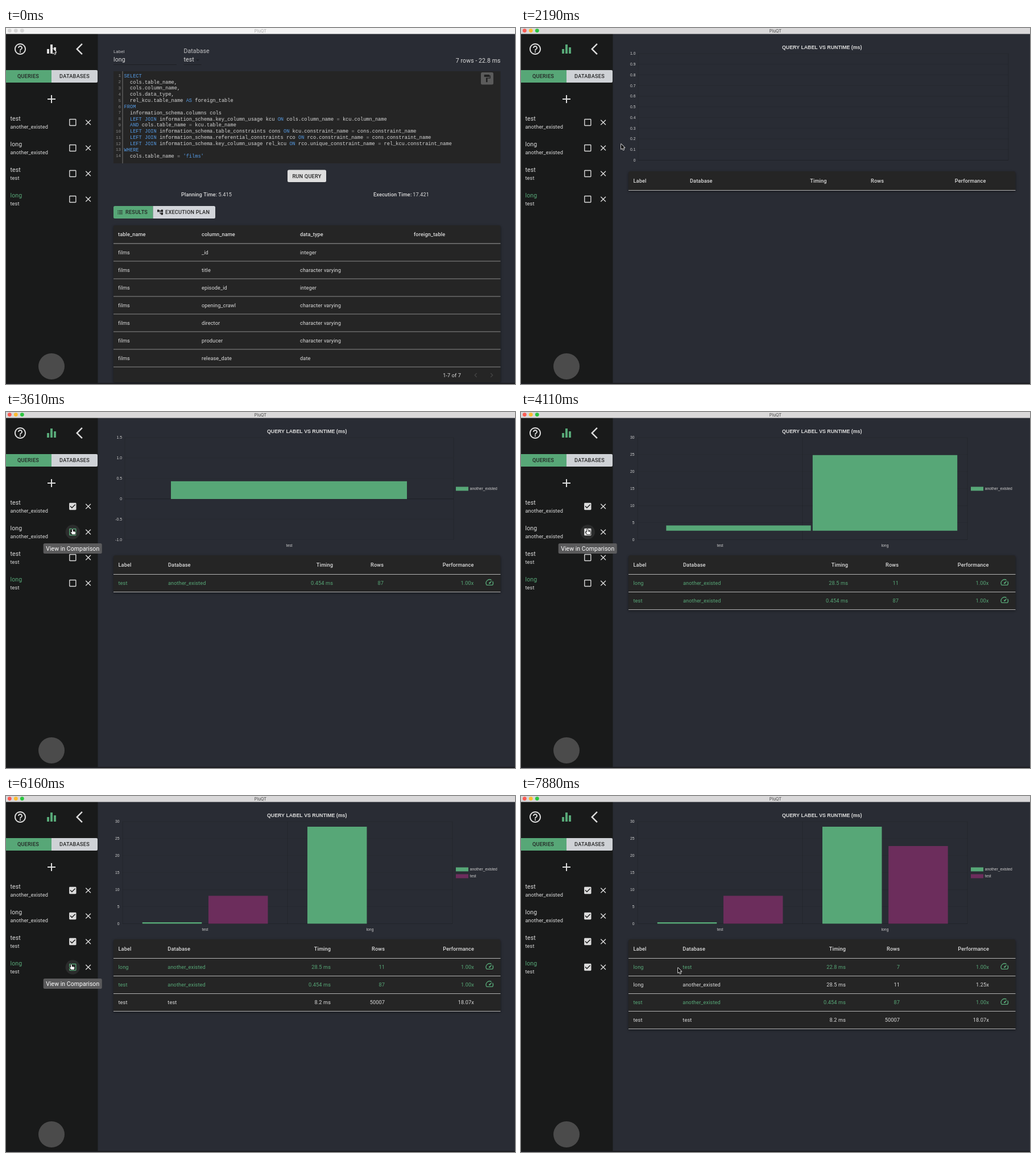
Recreate the animation shown at these times as an HTML page with a canvas. Size 895 by 626 pixels, loop 8 s.

```html
<!DOCTYPE html>
<html lang="en">
<head>
<meta charset="utf-8">
<title>Query comparison</title>
<style>
  html, body { margin: 0; width: 895px; height: 626px; overflow: hidden; background: #292c34; }
  canvas { display: block; }
</style>
</head>
<body>
<canvas id="stage" width="895" height="626"></canvas>
<script>
const ctx = document.getElementById('stage').getContext('2d');
const LOOP = 8000;
const GREEN = '#57a777', PURPLE = '#6c2d5c', LIGHT = '#dcdcdc', PANEL = '#252525', BLUE = '#569ce6';
const UI = 'Roboto, sans-serif', CHART = '"Liberation Sans", Arial, sans-serif';
const MONO = '"Liberation Mono", monospace';

// The screen refreshes in bursts: [first, last, count]
const bursts = [[140, 710, 4], [1010, 1310, 3], [1670, 2510, 6], [2960, 3940, 7],
  [4110, 4800, 5], [5120, 6160, 7], [6340, 7350, 7], [7530, 7880, 3]];
const refreshes = [0, ...bursts.flatMap(([a, b, n]) =>
  Array.from({ length: n }, (_, i) => Math.round(a + (b - a) * i / (n - 1))))];

const COMPARE_AT = 1010;
const checkedAt = [2910, 3795, 5070, 6290];
const hovers = [[2340, 3120], [3280, 4280], [4450, 5700], [5800, 6800]];
const cursorPath = [[0, 82, 36], [140, 82, 36], [520, 80, 39], [1500, 80, 39], [1670, 128, 84], [1838, 205, 150],
  [2006, 238, 226], [2174, 176, 204], [2342, 115, 162], [2510, 115, 162], [2960, 113, 192],
  [3287, 116, 206], [4110, 116, 206], [4455, 112, 251], [4800, 111, 254], [5467, 111, 254],
  [5813, 114, 296], [6500, 114, 296], [7013, 160, 318], [7350, 236, 345], [7530, 320, 377],
  [7705, 300, 338], [7880, 276, 302]];

const icons = {
  help: 'M11 18h2v-2h-2v2zm1-16C6.48 2 2 6.48 2 12s4.48 10 10 10 10-4.48 10-10S17.52 2 12 2zm0 18c-4.41 0-8-3.59-8-8s3.59-8 8-8 8 3.59 8 8-3.59 8-8 8zm0-14c-2.21 0-4 1.79-4 4h2c0-1.1.9-2 2-2s2 .9 2 2c0 2-3 1.75-3 5h2c0-2.25 3-2.5 3-5 0-2.21-1.79-4-4-4z',
  bars: 'M10 20h4V4h-4v16zm-6 0h4v-8H4v8zM16 9v11h4V9h-4z',
  back: 'M17.77 3.77L16 2 6 12l10 10 1.77-1.77L9.54 12z',
  add: 'M19 13h-6v6h-2v-6H5v-2h6V5h2v6h6v2z',
  box: 'M19 5v14H5V5h14m0-2H5c-1.1 0-2 .9-2 2v14c0 1.1.9 2 2 2h14c1.1 0 2-.9 2-2V5c0-1.1-.9-2-2-2z',
  checked: 'M19 3H5c-1.11 0-2 .9-2 2v14c0 1.1.89 2 2 2h14c1.11 0 2-.9 2-2V5c0-1.1-.89-2-2-2zm-9 14l-5-5 1.41-1.41L10 14.17l7.59-7.59L19 8l-9 9z',
  close: 'M19 6.41L17.59 5 12 10.59 6.41 5 5 6.41 10.59 12 5 17.59 6.41 19 12 13.41 17.59 19 19 17.59 13.41 12z',
  speed: 'M20.38 8.57l-1.23 1.85a8 8 0 0 1-.22 7.58H5.07A8 8 0 0 1 15.58 6.85l1.85-1.23A10 10 0 0 0 3.35 19a2 2 0 0 0 1.72 1h13.85a2 2 0 0 0 1.74-1 10 10 0 0 0-.27-10.44zm-9.79 6.84a2 2 0 0 0 2.83 0l5.66-8.49-8.49 5.66a2 2 0 0 0 0 2.83z',
  paint: 'M18 4V3c0-.55-.45-1-1-1H5c-.55 0-1 .45-1 1v4c0 .55.45 1 1 1h12c.55 0 1-.45 1-1V6h1v4H9v11c0 .55.45 1 1 1h2c.55 0 1-.45 1-1v-9h8V4h-3z',
  list: 'M2 5h3v2H2zm5 0h15v2H7zM2 11h3v2H2zm5 0h15v2H7zM2 17h3v2H2zm5 0h15v2H7z',
  tree: 'M22 11V3h-7v3H9V3H2v8h7V8h2v10h4v3h7v-8h-7v3h-2V8h2v3z',
  prev: 'M15.41 7.41L14 6l-6 6 6 6 1.41-1.41L10.83 12z',
  next: 'M10 6L8.59 7.41 13.17 12l-4.58 4.59L10 18l6-6z',
};
for (const name in icons) icons[name] = new Path2D(icons[name]);
const arrow = new Path2D('M0 0V9L2.1 7.1 3.6 10.5 5 9.9 3.6 6.6H6.4Z');
const hand = new Path2D('M0 1C0-.3 1.7-.3 1.7 1V4L5.6 4.6Q6.6 4.8 6.4 6L5.8 9.3H.6L-2 6Q-2.2 4.8-1 5L0 6Z');

function rect(x, y, w, h, color, radius = 0) {
  ctx.fillStyle = color;
  ctx.beginPath();
  ctx.roundRect(x, y, w, h, radius);
  ctx.fill();
}

function circle(x, y, r, color) {
  ctx.fillStyle = color;
  ctx.beginPath();
  ctx.arc(x, y, r, 0, 7);
  ctx.fill();
}

// y is the middle of the capitals
function text(str, x, y, { size = 9.2, color = LIGHT, align = 'left', weight = 400, font = UI, gap = 0.1 } = {}) {
  ctx.font = `${weight} ${size}px ${font}`;
  ctx.letterSpacing = `${gap}px`;
  ctx.textAlign = align;
  ctx.fillStyle = color;
  ctx.fillText(str, x, y + size * 0.355);
}

function icon(name, x, y, color = LIGHT, scale = 1) {
  ctx.save();
  ctx.translate(x - 12 * scale, y - 12 * scale);
  ctx.scale(scale, scale);
  ctx.fillStyle = color;
  ctx.fill(icons[name], 'evenodd');
  ctx.restore();
}

function panel(x, y, w, h, radius) {
  ctx.save();
  ctx.shadowColor = 'rgba(0,0,0,.45)';
  ctx.shadowBlur = 4;
  ctx.shadowOffsetY = 1.5;
  rect(x, y, w, h, PANEL, radius);
  ctx.restore();
}

const rule = (y, color = '#a2a2a2') => rect(189, y, 680.5, 1, color);
const button = (str, x, y, color = '#222', align = 'center') =>
  text(str, x, y, { color, align, weight: 500, gap: 0.22 });

function tooltip(str, x, y, w) {
  rect(x, y - 9, w, 18, 'rgba(94,94,95,.95)', 2.5);
  text(str, x + w / 2, y, { size: 10.4, color: '#fff', align: 'center' });
}

function titleBar(focused) {
  rect(0, 0, 895, 10.5, focused ? '#d9d8d9' : '#f3f3f3');
  ['#fc5b53', '#fdbc2f', '#2ac63f'].forEach((c, i) => circle(6.3 + 11 * i, 4.6, 3.4, focused ? c : '#d6d6d6'));
  text('PluQT', 447.5, 5, { size: 7.5, color: focused ? '#444' : '#aaa', align: 'center', font: 'Inter, sans-serif', gap: 0 });
}

function sidebar(t, stage) {
  const comparing = t >= COMPARE_AT;
  rect(0, 10, 161.5, 616, '#191a1a');
  if (comparing && t < 1310) circle(80, 37, 15, '#20392b');
  icon('help', 25, 37);
  icon('bars', 80, 37, comparing ? GREEN : LIGHT);
  icon('back', 129, 37);
  rect(0, 74, 80, 22, GREEN);
  rect(80, 74, 81, 22, '#cfd2d6', [0, 2, 2, 0]);
  button('QUERIES', 39, 85);
  button('DATABASES', 120.5, 85);
  icon('add', 80, 125);
  ['test', 'long', 'test', 'long'].forEach((label, i) => {
    const y = 166 + 45 * i, on = i < stage;
    const hovered = t >= hovers[i][0] && t < hovers[i][1];
    text(label, 7.5, y - 7, { size: 10.5, color: i === 3 ? GREEN : LIGHT });
    text(i < 2 ? 'another_existed' : 'test', 7.5, y + 7.5);
    if (hovered) circle(117.3, y, 12.7, '#2b2c2c');
    icon(on ? 'checked' : 'box', 117.3, y, hovered && !on ? GREEN : LIGHT, 0.69);
    icon('close', 144.6, y, LIGHT, 0.69);
  });
  circle(80, 595, 23, '#4b4b4b');
}

const sql = `SELECT
  cols.table_name,
  cols.column_name,
  cols.data_type,
  rel_kcu.table_name AS foreign_table
FROM
  information_schema.columns cols
  LEFT JOIN information_schema.key_column_usage kcu ON cols.column_name = kcu.column_name
  AND cols.table_name = kcu.table_name
  LEFT JOIN information_schema.table_constraints cons ON kcu.constraint_name = cons.constraint_name
  LEFT JOIN information_schema.referential_constraints rco ON rco.constraint_name = cons.constraint_name
  LEFT JOIN information_schema.key_column_usage rel_kcu ON rco.unique_constraint_name = rel_kcu.constraint_name
WHERE
  cols.table_name = 'films'`.split('\n');

function editor() {
  rect(189, 76, 680.5, 162, PANEL);
  rect(204.5, 76, 1, 162, '#777');
  sql.forEach((line, i) => {
    const y = 83.6 + 10.85 * i;
    text(i + 1, 202, y, { size: 7.6, color: '#858585', align: 'right', font: MONO, gap: 0 });
    for (const { 0: word, index } of line.matchAll(/\S+/g)) {
      const color = /^([A-Z]+|'.*')$/.test(word) ? BLUE : word === '=' ? '#999' : '#d8d8d8';
      text(word, 207.6 + index * 5.193, y, { size: 8.655, color, font: MONO, gap: 0 });
    }
  });
  rect(835, 78, 22, 21.5, '#5b5b5b', 2.5);
  icon('paint', 846, 88.7, '#222', 0.66);
}

function queryView() {
  text('Label', 189, 41.5, { size: 7.9, color: '#c4c4c6' });
  text('long', 189, 55, { size: 10.5 });
  text('Database', 312.5, 40, { size: 10.5, color: '#c4c4c6' });
  text('test', 312.5, 55, { size: 10.5 });
  rect(189, 64, 111, 1, '#1d1f24');
  rect(312.5, 64, 31, 1, '#1d1f24');
  ctx.fill(new Path2D('M334 55h6l-3 3z'));
  text('7 rows - 22.8 ms', 869.5, 57.5, { size: 10.5, align: 'right' });
  editor();
  rect(495, 249.5, 68, 21.5, '#dedede', 2.5);
  button('RUN QUERY', 529, 260.3);
  for (const [name, x, value, vx] of [['Planning Time:', 308, '5.415', 397], ['Execution Time:', 646, '17.421', 744]]) {
    text(name, x, 292.5, { weight: 500 });
    text(value, vx, 292.5, { align: 'right' });
  }
  rect(189, 313, 69.5, 22, GREEN, [2.5, 0, 0, 2.5]);
  rect(258.5, 313, 109.5, 22, '#d2d5da', [0, 2.5, 2.5, 0]);
  icon('list', 200.5, 324, '#222', 0.45);
  icon('tree', 271, 324, '#222', 0.5);
  button('RESULTS', 210, 324, '#222', 'left');
  button('EXECUTION PLAN', 280, 324, '#222', 'left');

  panel(189, 347, 680.5, 276, 3);
  const columns = [197, 344, 517, 717];
  ['table_name', 'column_name', 'data_type', 'foreign_table'].forEach((name, i) =>
    text(name, columns[i], 362.5, { weight: 500 }));
  rule(378.5);
  const varchar = 'character varying';
  [['_id', 'integer'], ['title', varchar], ['episode_id', 'integer'], ['opening_crawl', varchar],
    ['director', varchar], ['producer', varchar], ['release_date', 'date']].forEach((cells, i) => {
    ['films', ...cells].forEach((cell, c) => text(cell, columns[c], 395 + 31 * i));
    rule(409.5 + 31 * i, '#8b8b8b');
  });
  text('1-7 of 7', 800, 611, { align: 'right' });
  icon('prev', 826, 610.5, '#444', 0.66);
  icon('next', 854, 610.5, '#444', 0.66);
}

// Bar poses: [centre, width, top, base], one per stage from the first on
const BASE = 224.6, HALF = 104.5;
const value = v => BASE - v * 5.987;
const barSets = [
  [GREEN, 1, [[497.5, 415, 153, 153], [497.5, 415, 120.3, 153], [350, 209, value(0.454), BASE], [292, HALF, value(0.454), BASE]]],
  [GREEN, 2, [[640, 415, 153, 153], [640, 209, value(28.5), BASE], [582.2, HALF, value(28.5), BASE]]],
  [PURPLE, 3, [[408.2, HALF, BASE, BASE], [408.2, HALF, value(8.2), BASE]]],
  [PURPLE, 4, [[698.4, HALF, BASE, BASE], [698.4, HALF, value(22.8), BASE]]],
];
const axes = [
  { left: 206, right: 857, bottom: 232.5, labelX: 201.5, min: 0, step: 0.1, count: 10, digits: 1, names: [] },
  { left: 209, right: 787, bottom: BASE, labelX: 204, min: -1, step: 0.5, count: 5, digits: 1, names: ['test'] },
  { left: 205, right: 785, bottom: BASE, labelX: 199.5, min: 0, step: 5, count: 6, digits: 0, names: ['test', 'long'] },
];

function chart(t, stage) {
  const label = { size: 6.75, color: '#cfcfcf', font: CHART, gap: 0 };
  const axis = axes[Math.min(stage, 2)];
  const { left, right, bottom, names } = axis;
  text('QUERY LABEL VS RUNTIME (ms)', 529.2, 34.3, { size: 8.8, weight: 700, align: 'center', font: CHART, gap: 0 });
  for (let i = 0; i <= axis.count; i++) {
    const v = axis.min + axis.step * i, y = bottom - (bottom - 45) * i / axis.count;
    const zero = Math.abs(v) < 1e-6;
    rect(left, y - 0.4, right - left, 0.8, zero ? 'rgba(0,0,0,.25)' : 'rgba(0,0,0,.1)');
    text(zero ? '0' : v.toFixed(axis.digits), axis.labelX, y, { ...label, align: 'right' });
  }
  const span = (right - left) / (names.length || 1);
  for (let x = left; x <= right; x += span) rect(x - 0.4, 45, 0.8, bottom - 45, 'rgba(0,0,0,.16)');
  names.forEach((name, i) => text(name, left + span * (i + 0.5), 234.3, { ...label, align: 'center' }));

  const progress = Math.min(1, (t - checkedAt[stage - 1]) / 1000);
  const eased = 1 - (1 - progress) ** 4;
  for (const [color, first, poses] of barSets) {
    if (stage < first) continue;
    const at = i => poses[Math.min(i, poses.length - 1)];
    const from = at(stage - first), to = at(stage - first + 1);
    const [x, w, top, base] = from.map((v, i) => v + (to[i] - v) * eased);
    rect(x - w / 2, top, w, base - top, color);
  }
  if (!stage) return;
  const legend = stage > 2 ? [['another_existed', GREEN, 129], ['test', PURPLE, 141]] : [['another_existed', GREEN, 135]];
  for (const [name, color, y] of legend) {
    rect(791, y - 3.5, 22, 7, color);
    text(name, 815.8, y, label);
  }
}

// [label, database, timing, rows, performance]; 1.00x marks the fastest
const longOther = ['long', 'another_existed', '28.5 ms', '11', '1.00x'];
const testOther = ['test', 'another_existed', '0.454 ms', '87', '1.00x'];
const testTest = ['test', 'test', '8.2 ms', '50007', '18.07x'];
const longTest = ['long', 'test', '22.8 ms', '7', '1.00x'];
const tables = [[], [testOther], [longOther, testOther], [longOther, testOther, testTest],
  [longTest, [...longOther.slice(0, 4), '1.25x'], testOther, testTest]];

function comparisonTable(stage) {
  const rows = tables[stage];
  const columns = stage > 2 ? [197.5, 284.3, 571, 666, 823] : stage ? [197.5, 285, 575, 664, 822.5] : [197.5, 297, 537.5, 638, 817.5];
  const line = (cells, y, style) => cells.forEach((cell, i) =>
    text(cell, columns[i], y, { ...style, align: i > 1 ? 'right' : 'left' }));
  panel(189, 252, 680.5, 34 + 31 * rows.length, [4, 4, 0, 0]);
  line(['Label', 'Database', 'Timing', 'Rows', 'Performance'], 268.5, { weight: 500 });
  rule(285, '#b4b4b4');
  rows.forEach((cells, i) => {
    const y = 301 + 31 * i, best = cells[4] === '1.00x';
    line(cells, y, { color: best ? GREEN : LIGHT });
    if (best) icon('speed', 850.3, y - 1.5, GREEN, 0.69);
    rule(y + 15, '#b4b4b4');
  });
}

function cursor(t) {
  let i = cursorPath.findIndex(key => key[0] > t);
  if (i < 0) i = cursorPath.length;
  const [ta, xa, ya] = cursorPath[i - 1], [tb, xb, yb] = cursorPath[i] || [LOOP, xa, ya];
  const k = (t - ta) / (tb - ta);
  const pointing = (t >= 330 && t < 1670) || hovers.some(([a, b]) => t >= a && t < b);
  ctx.save();
  ctx.translate(xa + (xb - xa) * k, ya + (yb - ya) * k);
  ctx.lineWidth = 1.6;
  ctx.lineJoin = 'round';
  ctx.strokeStyle = pointing ? '#111' : '#eee';
  ctx.fillStyle = pointing ? '#fff' : '#111';
  const shape = pointing ? hand : arrow;
  ctx.stroke(shape);
  ctx.fill(shape);
  ctx.restore();
}

function draw(now) {
  const time = now % LOOP;
  const t = refreshes.findLast(r => r <= time);
  const stage = checkedAt.filter(c => c <= t).length;
  rect(0, 0, 895, 626, '#292c34');
  if (t < COMPARE_AT) {
    queryView();
  } else {
    chart(t, stage);
    comparisonTable(stage);
  }
  sidebar(t, stage);
  rect(0, 624, 895, 2, '#1b1c20');
  titleBar(t >= 140);
  if (t >= 520 && t < 1830) tooltip('Compare Queries', 34, 71.5, 91);
  hovers.forEach(([a, b], i) => {
    if (t >= a + 150 && t < b) tooltip('View in Comparison', 65.7, 195 + 45 * i, 103);
  });
  cursor(t);
  requestAnimationFrame(() => draw(performance.now() - start));
}

const start = performance.now();
draw(0);
</script>
</body>
</html>
```
